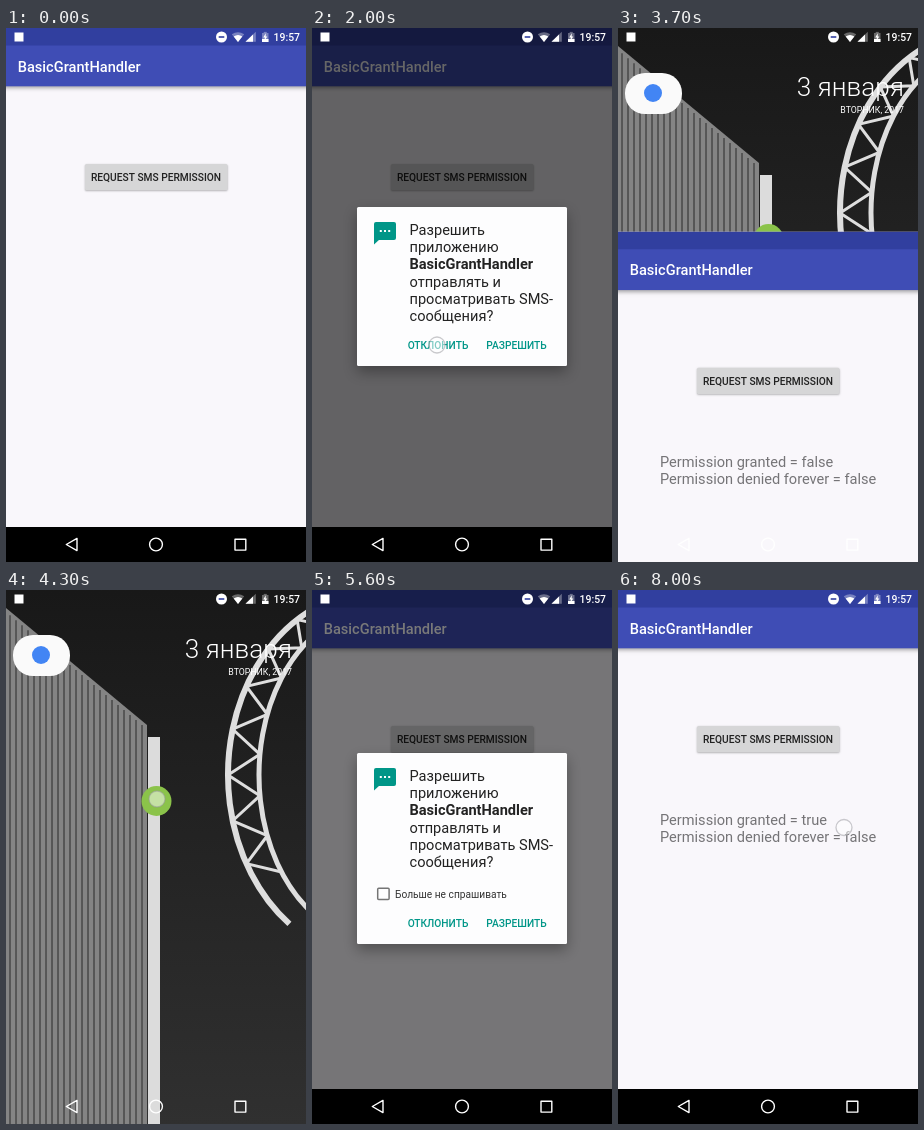
An HTML page with a canvas for the animation above (8.1 s loop, 300 by 534 pixels).

```html
<!DOCTYPE html>
<html lang="ru">
<head>
<meta charset="utf-8">
<title>Permission demo</title>
<style>
html, body { margin: 0; width: 100%; height: 100%; overflow: hidden; background: #000; }
canvas { display: block; width: 300px; height: 534px; }
</style>
</head>
<body>
<canvas id="stage"></canvas>
<script>
const W = 300, H = 534, LOOP = 8100, STEP = 100;
const APP = 'BasicGrantHandler';
const TEAL = '#009688';
const canvas = document.getElementById('stage');
const ctx = canvas.getContext('2d');
const dpr = window.devicePixelRatio || 1;
canvas.width = W * dpr;
canvas.height = H * dpr;

const progress = (t, from, to) => Math.min(1, Math.max(0, (t - from) / (to - from)));
const easeOut = (p, k) => 1 - Math.pow(1 - p, k);

function rect(x, y, w, h, color) {
  ctx.fillStyle = color;
  ctx.fillRect(x, y, w, h);
}

function box(x, y, w, h, r, color) {
  ctx.fillStyle = color;
  ctx.beginPath();
  ctx.roundRect(x, y, w, h, r);
  ctx.fill();
}

function poly(points, color) {
  ctx.fillStyle = color;
  ctx.beginPath();
  for (let i = 0; i < points.length; i += 2) ctx.lineTo(points[i], points[i + 1]);
  ctx.closePath();
  ctx.fill();
}

function disc(x, y, r, color) {
  ctx.fillStyle = color;
  ctx.beginPath();
  ctx.arc(x, y, r, 0, Math.PI * 2);
  ctx.fill();
}

function text(str, x, y, size, weight, color, align = 'left') {
  ctx.font = `${weight} ${size}px Roboto, sans-serif`;
  ctx.textAlign = align;
  ctx.fillStyle = color;
  ctx.fillText(str, x, y);
}

function shadow(color, blur, dy) {
  ctx.shadowColor = color;
  ctx.shadowBlur = blur * dpr;
  ctx.shadowOffsetY = dy * dpr;
}

function layer(draw) {
  ctx.save();
  draw();
  ctx.restore();
}

function arch(rx, ry, width) {
  ctx.lineWidth = width;
  ctx.beginPath();
  ctx.ellipse(371, 185, rx, ry, 0, Math.PI * 0.7, Math.PI * 1.5);
  ctx.stroke();
}

function drawHome() {
  const sky = ctx.createLinearGradient(0, 0, 0, H);
  sky.addColorStop(0, '#181818');
  sky.addColorStop(1, '#303030');
  rect(0, 0, W, H, sky);

  // Buildings
  rect(142, 147, 12, H, '#dcdcdc');
  poly([0, 18, 141, 135, 141, H, 0, H], '#848484');
  ctx.strokeStyle = '#4c4c4c';
  ctx.lineWidth = 1.6;
  ctx.beginPath();
  for (let x = 4; x < 141; x += 6) {
    ctx.moveTo(x, 22 + x * 0.83);
    ctx.lineTo(x, H);
  }
  ctx.stroke();

  // Steel arches
  ctx.strokeStyle = '#dedede';
  arch(149, 184, 6);
  arch(118, 165, 5);
  ctx.lineWidth = 3;
  ctx.beginPath();
  for (let i = 0; i < 17; i++) {
    const a = Math.PI * (0.8 + i * 0.04), outer = i % 2;
    ctx.lineTo(371 + (outer ? 149 : 118) * Math.cos(a), 185 + (outer ? 184 : 165) * Math.sin(a));
  }
  ctx.stroke();

  box(7, 45, 57, 41, 20, '#fafafa');
  disc(35, 65, 9, '#4285f4');
  text('3 января', 286, 68, 26.2, 300, '#fff', 'right');
  text('ВТОРНИК, 2017', 286, 85, 8.75, 400, '#fff', 'right');
  disc(150.5, 211, 15, '#8bc34a');
}

function drawApp(result) {
  rect(0, 0, W, H * 2, '#f9f7fb');
  layer(() => {
    shadow('rgba(0,0,0,.35)', 4, 1.5);
    rect(-10, 10, W + 20, 48.3, '#3f4db5');
  });
  rect(0, 0, W, 17.5, '#313f9f');
  text(APP, 11.7, 43.6, 14.58, 500, '#fff');

  layer(() => {
    shadow('rgba(0,0,0,.3)', 2, 0.7);
    box(79, 136, 142.5, 26.3, 1.5, '#d6d6d7');
  });
  text('REQUEST SMS PERMISSION', 150, 153, 10.2, 500, '#212121', 'center');

  if (result) {
    text('Permission granted = ' + result, 42, 235.3, 14.58, 400, '#757477');
    text('Permission denied forever = false', 42, 252.4, 14.58, 400, '#757477');
  }
  rect(0, 499, W, 35, '#000');
}

function drawDialog(again) {
  const top = again ? 163 : 179, height = again ? 191 : 159;
  layer(() => {
    shadow('rgba(0,0,0,.32)', 14, 6);
    box(45, top, 210, height, 1.5, '#fdfdfe');
  });

  box(62, top + 15, 22, 18, 2, TEAL);
  poly([62, top + 30, 68, top + 32, 62, top + 37.5], TEAL);
  for (let i = -1; i < 2; i++) rect(72 + i * 4.2, top + 23, 2, 2, '#fff');

  const lines = ['Разрешить', 'приложению', APP, 'отправлять и', 'просматривать SMS-', 'сообщения?'];
  lines.forEach((line, i) =>
    text(line, 97.5, top + 28.2 + i * 17.1, 14.58, line === APP ? 700 : 400, '#222'));

  if (again) {
    ctx.strokeStyle = '#757575';
    ctx.lineWidth = 1.5;
    ctx.beginPath();
    ctx.roundRect(65.7, 298.2, 11.4, 11.4, 1);
    ctx.stroke();
    text('Больше не спрашивать', 83, 307.6, 10.2, 400, '#333');
  }
  const base = top + height - 17;
  text('ОТКЛОНИТЬ', 126, base, 10.2, 500, TEAL, 'center');
  text('РАЗРЕШИТЬ', 204.5, base, 10.2, 500, TEAL, 'center');
}

function wifi(x, y, r, color) {
  ctx.fillStyle = color;
  ctx.beginPath();
  ctx.moveTo(x, 14);
  ctx.lineTo(x - r, y);
  ctx.quadraticCurveTo(x, y - r * 0.7, x + r, y);
  ctx.fill();
}

function drawStatus() {
  const faint = 'rgba(255,255,255,.35)';
  box(8.5, 4.5, 9, 9, 0, '#fff');
  disc(215.5, 9, 5.5, '#fff');
  rect(212.7, 8.2, 5.6, 1.6, '#313f9f');

  wifi(232, 6.3, 6.2, faint);
  wifi(232, 8.6, 4.3, '#fff');

  poly([239.5, 13.8, 249.8, 3.8, 249.8, 13.8], faint);
  poly([239.5, 13.8, 247, 6.5, 247, 13.8], '#fff');

  rect(256, 5, 6.5, 9, faint);
  rect(257.7, 3.9, 3.1, 1.2, faint);
  rect(256, 11, 6.5, 3, '#fff');
  poly([259.8, 5.2, 257.2, 9.6, 258.8, 9.6, 258.5, 12.8, 261.3, 8.6, 259.7, 8.6], '#fff');
  text('19:57', 294, 12.8, 10.4, 500, '#fff', 'right');
}

function drawNav() {
  ctx.strokeStyle = '#fff';
  ctx.lineWidth = 1.4;
  ctx.lineJoin = 'round';
  ctx.beginPath();
  ctx.moveTo(60.3, 516.5);
  ctx.lineTo(71, 510.4);
  ctx.lineTo(71, 522.6);
  ctx.closePath();
  ctx.moveTo(156.4, 516.5);
  ctx.arc(150, 516.5, 6.4, 0, Math.PI * 2);
  ctx.rect(229, 511.3, 10.8, 10.8);
  ctx.stroke();
}

const touches = [
  { from: 400, to: 600, x: 189, y: 147 },
  { from: 1900, to: 2100, x: 125, y: 317 },
  { from: 3400, to: 3600, x: 66, y: 516 },
  { from: 4200, to: 4400, x: 151, y: 209 },
  { from: 5100, to: 5300, x: 189, y: 147 },
  { from: 6700, to: 6900, x: 204, y: 333 },
  { from: 7800, to: 8100, x: 226, y: 237.5 }
];

function drawTouch(t) {
  const touch = touches.find(p => t >= p.from && t < p.to);
  if (!touch) return;
  disc(touch.x, touch.y, 8, 'rgba(255,255,255,.5)');
  ctx.strokeStyle = 'rgba(150,150,155,.5)';
  ctx.lineWidth = 1.3;
  ctx.stroke();
}

// Vertical offset of the app window
function appOffset(t) {
  if (t < 3500 || t >= 4700) return 0;
  if (t < 4300) return H * Math.pow(progress(t, 3500, 3900), 1.39);
  return H * (1 - easeOut(progress(t, 4300, 4700), 2));
}

function resultAt(t) {
  if (t >= 7000) return 'true';
  return t >= 2200 && t < 4300 ? 'false' : '';
}

function drawPrompt(t, open, close, again) {
  if (t < open || t >= close + 500) return;
  const dim = easeOut(progress(t, open + 200, open + 600), 1.5) * (1 - progress(t, close + 100, close + 500));
  const alpha = progress(t, open + 200, open + 500) * (1 - progress(t, close + 100, close + 400));
  rect(0, 0, W, 499, `rgba(0,0,0,${0.6 * dim})`);
  if (alpha > 0) layer(() => {
    ctx.globalAlpha = alpha;
    drawDialog(again);
  });
}

function draw(t) {
  ctx.setTransform(dpr, 0, 0, dpr, 0, 0);
  const dy = appOffset(t);
  if (dy > 0) drawHome();
  if (dy < H) layer(() => {
    ctx.translate(0, dy);
    drawApp(resultAt(t));
  });
  drawPrompt(t, 400, 1900, false);
  drawPrompt(t, 5100, 6700, true);
  drawStatus();
  drawNav();
  drawTouch(t);
}

const start = performance.now();
function tick() {
  const t = (performance.now() - start) % LOOP;
  draw(Math.floor(t / STEP) * STEP);
  requestAnimationFrame(tick);
}
tick();
</script>
</body>
</html>
```
